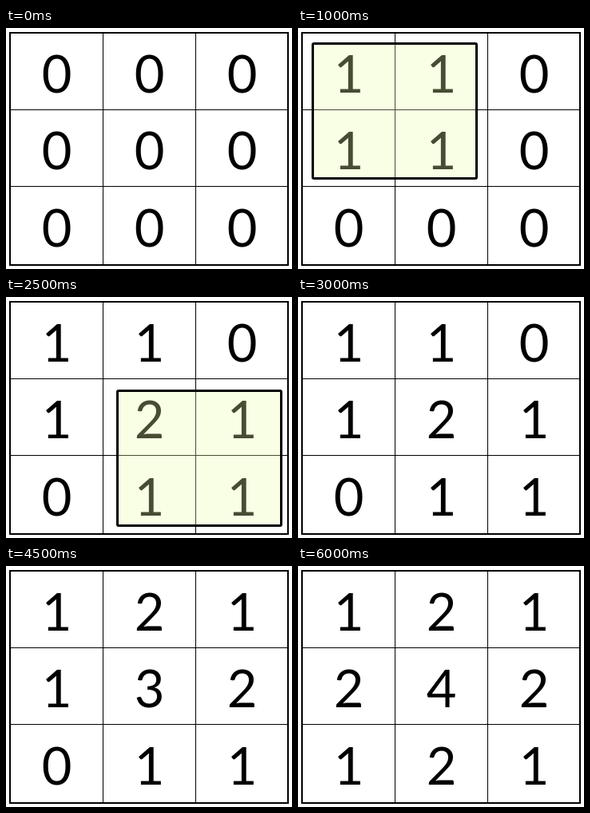
An HTML page that plays this animation: 358x302 px, repeating every 8000 ms.

```html
<!DOCTYPE html>
<html lang="en">
<head>
<meta charset="utf-8">
<title>Counting overlaps in a grid</title>
<style>
  html, body { margin: 0; width: 100%; height: 100%; overflow: hidden; background: #fff; }
  svg { display: block; width: 100%; height: 100%; }
  text { font: 65px Lato, "Open Sans", sans-serif; text-anchor: middle; }
</style>
</head>
<body>
<svg id="stage" viewBox="0 0 358 302"></svg>
<script>
const NS = 'http://www.w3.org/2000/svg';
const stage = document.getElementById('stage');
const LOOP = 8000, STEP = 500;

// Top-left cell [column, row] of each 2x2 window, in order of visit.
const windows = [[0, 0], [1, 1], [1, 0], [0, 1]];

function add(tag, attrs) {
  const el = document.createElementNS(NS, tag);
  for (const key in attrs) el.setAttribute(key, attrs[key]);
  return stage.appendChild(el);
}

add('path', {
  d: 'M121.5 6V297M237.5 6V297M5 102.5H353M5 198.5H353',
  stroke: '#000', 'shape-rendering': 'crispEdges'
});
add('rect', { x: 5, y: 6, width: 348, height: 291, fill: 'none', stroke: '#000', 'stroke-width': 2 });

const digits = [];
for (let i = 0; i < 9; i++) {
  digits.push(add('text', { x: 63.5 + 116 * (i % 3), y: 81 + 96.4 * Math.floor(i / 3) }));
}

const box = add('rect', {
  width: 205, height: 169, rx: 1.5,
  fill: 'rgb(235,255,165)', 'fill-opacity': 0.3,
  stroke: '#000', 'stroke-width': 3
});

const covers = ([c, r], col, row) => col >= c && col <= c + 1 && row >= r && row <= r + 1;

// Each window takes three steps: plain grid, box shown, cells counted up.
function draw(time) {
  const step = Math.floor((time % LOOP) / STEP);
  const index = Math.floor(step / 3);
  const current = windows[index];
  const counted = windows.slice(0, index + (step % 3 === 2 ? 1 : 0));

  digits.forEach((el, i) => {
    const value = String(counted.filter(w => covers(w, i % 3, Math.floor(i / 3))).length);
    if (el.textContent !== value) el.textContent = value;
  });

  const shown = current && step % 3 > 0;
  box.setAttribute('visibility', shown ? 'visible' : 'hidden');
  if (shown) {
    box.setAttribute('x', 18.5 + 121 * current[0]);
    box.setAttribute('y', 19.5 + 98 * current[1]);
  }
}

const start = performance.now();
function tick() {
  draw(performance.now() - start);
  requestAnimationFrame(tick);
}
tick();
</script>
</body>
</html>
```
